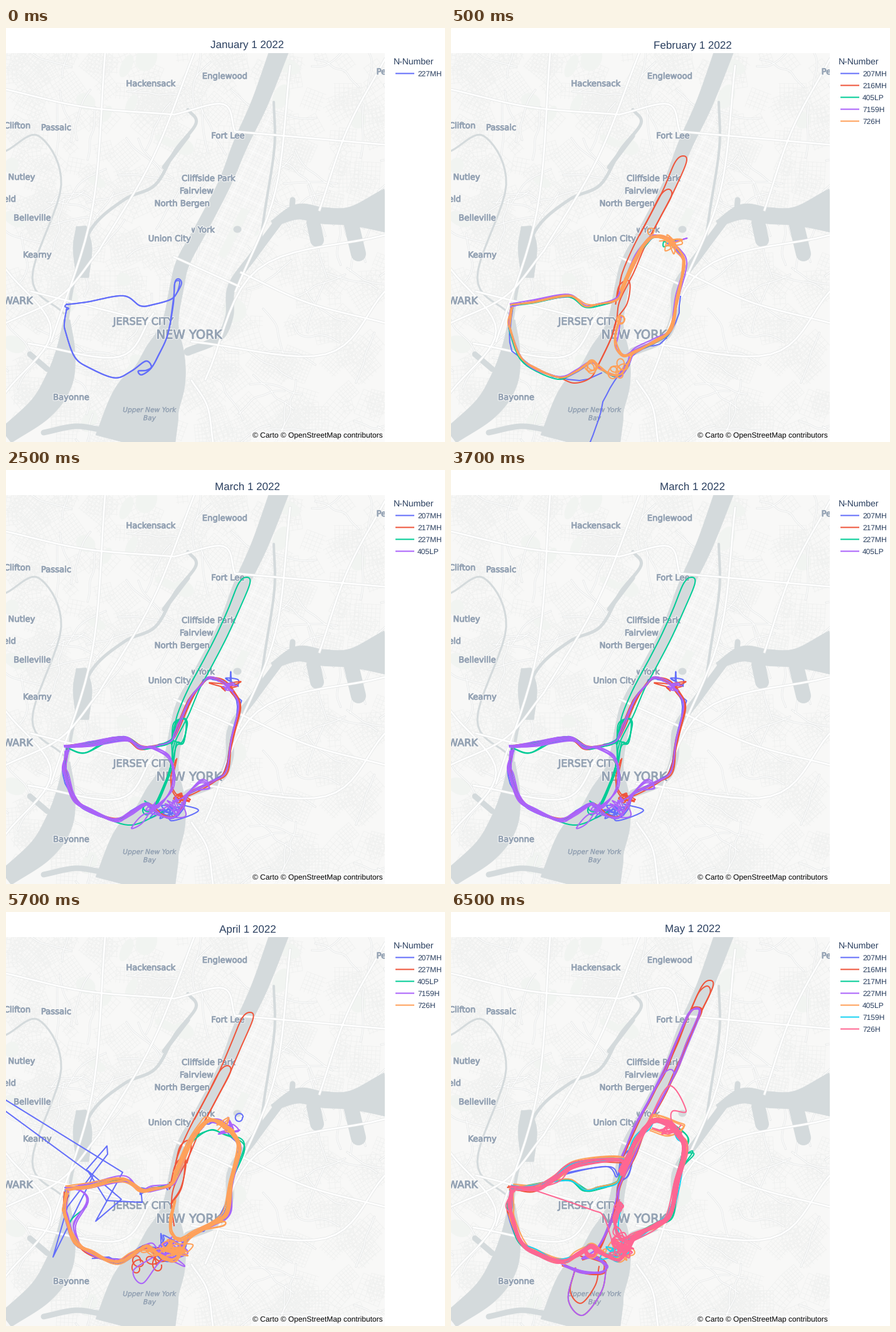
Animation of 700 by 660 pixels, one loop 8 s. Source, as a matplotlib script:

```python
import numpy as np
import matplotlib.pyplot as plt
from matplotlib import patheffects as pe
from matplotlib.animation import FuncAnimation
from matplotlib.collections import LineCollection
from matplotlib.patches import Ellipse, Polygon, Rectangle

plt.rcParams["text.hinting"] = "none"
W, H, PX = 700, 660, 0.72          # stage size, points per pixel
MAP_W, MAP_TOP = 604, 40
LAND, WATER, PARK, CASING = "#f8f8f7", "#d4dadc", "#f1f4f1", "#e5e7e7"
INK, LABEL = "#2a3f5f", "#95a3b4"
BLUE, RED, GREEN, PURPLE, ORANGE, CYAN, PINK = PALETTE = (
    "#636efa", "#ef553b", "#00cc96", "#ab63fa", "#ffa15a", "#19d3f3", "#ff6692")

rng = np.random.default_rng(11)
fig = plt.figure(figsize=(W / 100, H / 100), dpi=100, facecolor="white")
page = fig.add_axes([0, 0, 1, 1], xlim=(0, W), ylim=(H, 0))
city = fig.add_axes([0, 0, MAP_W / W, (H - MAP_TOP) / H], xlim=(0, MAP_W), ylim=(H, MAP_TOP))
for ax in (page, city):
    ax.axis("off")
city.add_patch(Rectangle((0, MAP_TOP), MAP_W, H, color=LAND, zorder=0))


def smooth(points, n=9):
    """Catmull-Rom curve through the points."""
    p = np.array(points, float)
    p = np.vstack([2 * p[0] - p[1], p, 2 * p[-1] - p[-2]])
    a, b, c, d = (p[i:len(p) - 3 + i, None] for i in range(4))
    t = np.linspace(0, 1, n, endpoint=False)[:, None]
    q = 2 * b + (c - a) * t + (2 * a - 5 * b + 4 * c - d) * t**2 + (3 * b - a - 3 * c + d) * t**3
    return np.vstack([(q / 2).reshape(-1, p.shape[1]), p[-2]])


# ---------- base map ----------
def ribbon(rows):
    """Water whose width changes along a centre line of (x, y, width)."""
    x, y, width = smooth(rows).T
    dx, dy = np.gradient(x), np.gradient(y)
    side = np.c_[-dy, dx] * (width / 2 / np.hypot(dx, dy))[:, None]
    mid = np.c_[x, y]
    city.add_patch(Polygon(np.vstack([mid + side, (mid - side)[::-1]]), color=WATER, lw=0.5, zorder=3))


def river(points, width):
    city.plot(*smooth(points).T, color=WATER, lw=width * PX, zorder=3, solid_capstyle="round")


def road(points, width, z):
    line = smooth(points).T
    city.plot(*line, color=CASING, lw=(width + 1.6) * PX, zorder=z)
    city.plot(*line, color="white", lw=width * PX, zorder=z + 0.1)


def highway(x0, y0, x1, y1, bend=0):
    middle = ((x0 + x1) / 2 - bend * np.sign(y1 - y0), (y0 + y1) / 2 + bend * np.sign(x1 - x0))
    road([(x0, y0), middle, (x1, y1)], 2.8, 4)


def street_grid(x, y, angle, size, gap):
    u = np.array([np.cos(angle), np.sin(angle)])
    v = np.array([-u[1], u[0]])
    return [[(x, y) + k * b - size * a, (x, y) + k * b + size * a]
            for a, b in ((u, v), (v, u)) for k in np.arange(-size, size + 1, gap)]


def streets():
    segments = []
    for x, y in rng.uniform((0, 40), (604, 660), (430, 2)):
        segments += street_grid(x, y, rng.uniform(0, 1.6), rng.uniform(9, 24), rng.uniform(5, 9))
    city.add_collection(LineCollection(segments, colors="#f0f1f0", linewidths=0.8 * PX, zorder=1))
    for x, y in rng.uniform((0, 40), (604, 660), (110, 2)):
        heading = rng.uniform(0, 2 * np.pi) + np.cumsum(rng.normal(0, 0.25, 6))
        steps = 17 * np.c_[np.cos(heading), np.sin(heading)]
        road((x, y) + np.cumsum(steps, axis=0), 1.3, 1.5)
    for x, y in rng.uniform((0, 40), (604, 660), (26, 2)):
        city.add_patch(Ellipse((x, y), *rng.uniform(10, 42, 2), angle=25, fc=PARK, zorder=1.2))


def manhattan():
    shape = Polygon([(274, 495), (284, 410), (345, 280), (422, 122), (425, 190), (408, 310),
                     (352, 405), (338, 489), (282, 508)], fc="#f7f7f6", ec="none", zorder=2)
    city.add_patch(shape)
    for gap, color in ((6, "#f0f1f1"), (24, "white")):
        grid = LineCollection(street_grid(350, 320, -1.12, 230, gap),
                              colors=color, linewidths=PX, zorder=2.1)
        city.add_collection(grid)
        grid.set_clip_path(shape)
    city.add_patch(Polygon([(338, 362), (350, 367), (388, 291), (376, 286)], fc=PARK, zorder=2.2))
    city.add_patch(Ellipse((369, 321), 13, 11, fc=WATER, zorder=2.3))


RIVER = [(438, 30, 30), (405, 118, 26), (374, 185, 23), (349, 247, 20), (314, 315, 20), (283, 372, 21),
         (273, 410, 22), (262, 470, 26), (254, 515, 62), (243, 560, 88), (222, 602, 112), (205, 665, 128)]


def waterways():
    ribbon(RIVER)
    ribbon([(97, 465, 10), (95, 515, 30), (84, 563, 44), (56, 606, 40), (0, 650, 28)])
    ribbon([(425, 312, 10), (465, 293, 24), (505, 299, 26), (550, 300, 30), (608, 292, 72)])
    ribbon([(122, 398, 20), (122, 350, 30), (120, 316, 16)])
    river([(38, 520), (66, 544)], 9)
    river([(60, 645), (110, 635), (150, 640)], 9)
    river([(490, 310), (496, 338)], 22)
    river([(550, 310), (562, 360)], 24)
    river([(456, 290), (457, 274)], 9)
    river([(290, 516), (338, 495), (356, 460), (360, 412), (395, 362), (438, 304)], 13)
    river([(404, 350), (413, 290), (428, 190), (427, 118)], 4)
    river([(97, 470), (108, 405), (135, 322), (188, 274), (238, 250), (270, 195), (303, 152), (290, 130)], 5)
    river([(92, 455), (42, 398), (88, 250), (52, 172), (0, 196)], 3)
    river([(252, 222), (290, 172)], 7)


def highways():
    for ends in ((0, 470, 148, 355, 14), (148, 355, 300, 40, 10), (0, 98, 268, 138, 8), (268, 138, 365, 165, -30),
                 (365, 165, 604, 186, 0), (158, 40, 72, 500, -22), (0, 385, 0, 580, -72), (36, 503, 235, 455, 45),
                 (40, 420, 238, 470), (268, 365, 372, 412), (453, 60, 366, 420, -20), (604, 50, 500, 290, 8),
                 (318, 560, 604, 330, -60), (375, 390, 604, 470, 8), (296, 500, 604, 420, 60), (296, 562, 330, 660, -8)):
        highway(*ends)


def place_name(name, x, y, size=13.2, weight=0.7, **style):
    effects = [pe.Stroke(linewidth=2.2, foreground=LAND)] if weight > 0.5 else []
    effects += [pe.Stroke(linewidth=weight, foreground=LABEL), pe.Normal()]
    return city.text(x, y, name, size=size * PX, family="DejaVu Sans", color=LABEL, ha="center",
                     va="center_baseline", clip_on=True, zorder=6, path_effects=effects, **style)


def place_names():
    names = [("Hackensack", 231, 88), ("Englewood", 349, 76), ("Fort Lee", 354, 171), ("Clifton", 18, 155),
             ("Passaic", 80, 158), ("Nutley", 25, 237), ("Bloomfield", -19, 272), ("Belleville", 42, 302),
             ("Kearny", 50, 361), ("Cliffside Park", 323, 239), ("Fairview", 304, 259),
             ("North Bergen", 281, 279), ("Union City", 261, 335), ("Bayonne", 104, 588), ("Pelham", 615, 69)]
    for name, x, y in names:
        place_name(name, x, y)
    place_name("NEWARK", 8, 434, 16)
    place_name("JERSEY CITY", 219, 467, 16)
    place_name("NEW YORK", 292, 488, 19.5)
    place_name("Upper New York", 229, 608, 10.7, 0.2, style="italic")
    place_name("Bay", 229, 621, 10.7, 0.2, style="italic")
    cut = place_name("New York", 303, 321, 13)
    cut.set_clip_path(Rectangle((296, 300), 60, 40, transform=city.transData))


# ---------- flight tracks ----------
groups = []


def month(title, codes):
    text = dict(family="Liberation Sans", color=INK)
    groups.append([page.text(385, 32, title, size=17 * PX, ha="center", **text)])
    for i, (code, color) in enumerate(zip(codes.split(), PALETTE)):
        y = 72.5 + 19 * i
        groups[-1] += page.plot([621, 651], [y, y], color=color, lw=2 * PX, solid_capstyle="butt", snap=False)
        groups[-1].append(page.text(656, y + 4.5, code, size=12 * PX, **text))


def draw(color, line):
    groups[-1] += city.plot(*np.array(line).T, color=color, lw=2 * PX, zorder=8, solid_joinstyle="round")


def track(color, points, copies=1, spread=0.0, rough=0.0):
    """Draw jittered copies of a path; rough adds spikes like a poor signal."""
    for _ in range(copies):
        p = np.array(points, float)
        line = smooth(p + spread * (0.6 * rng.normal(0, 1, 2) + 0.8 * rng.normal(0, 1, p.shape)))
        if rough:
            line = line[::3]
            line = line + (rng.random((len(line), 1)) < 0.25) * rng.normal(0, rough, line.shape)
        draw(color, line)


def tangle(color, center, size, knots):
    """Random wandering loops around a centre."""
    track(color, rng.normal(center, size, (knots, 2)))


def rings(color, center, radius, turns, wobble=1.0):
    t = np.linspace(0, 2 * np.pi * turns, 24 * turns)
    drift = wobble * np.c_[np.sin(0.23 * t), np.cos(0.31 * t)]
    draw(color, center + drift + radius * np.c_[np.cos(t), np.sin(t)])


WEST = [(97, 441), (130, 437), (187, 427), (214, 443), (235, 441), (262, 433)]
WEST_HIGH = [(97, 439), (135, 441), (165, 425), (200, 401), (271, 394)]
HUDSON = [(272, 417), (294, 367), (311, 343)]
TOP = [(324, 332), (345, 337), (362, 355)]
EAST = [(372, 378), (360, 430), (350, 480), (328, 498), (292, 517)]
DOWNTOWN = [(275, 522), (264, 510), (263, 490), (270, 462)]
HARBOR_TURN = [(282, 537), (268, 554), (252, 551), (236, 541)]
PIER = [(269, 435), (264, 465), (255, 495), (235, 537)]
SOUTH = [(223, 532), (200, 547), (174, 558), (135, 543), (110, 525), (95, 485), (93, 470), (97, 446)]
STATUE, HARBOR, MEADOW = (223, 540), (268, 540), (353, 343)


def lap(color, copies=1, spread=1.5, rough=0.0, west=WEST):
    track(color, west + HUDSON + TOP + EAST + HARBOR_TURN + SOUTH, copies, spread, rough)


def east_side(color, copies, spread=2.0):
    track(color, HUDSON + TOP + EAST + DOWNTOWN, copies, spread)


def upriver(color, tip, copies=1, spread=0.0, bottom=390, before=(), after=()):
    """Up one bank, a U-turn at the tip, and down the other bank."""
    river_x, river_y, _ = np.transpose(RIVER)
    ys = np.linspace(bottom, tip + 10, 2 + int((bottom - tip) / 50))
    xs = np.interp(ys, river_y, river_x) + 4
    up, down = np.c_[xs - 9, ys], np.c_[xs + 9, ys][::-1]
    track(color, [*before, *up, (xs[-1] + 4, tip), *down, *after], copies, spread)


def january():
    month("January 1 2022", "227MH")
    statue_loop = [(231, 543), (216, 553), (211, 547), (224, 546), (232, 540), (223, 531)]
    for shift in (0, 3):
        turn = [(272, 423), (280 - shift, 407), (275, 400 + shift), (269, 407), (267, 440 - 3 * shift)]
        track(BLUE, WEST + turn + [(258, 488), (243, 522)] + statue_loop + SOUTH[1:], 1, 0.15)
    track(BLUE, [(97, 440), (94, 444), (100, 447), (96, 450)])


def february():
    month("February 1 2022", "207MH 216MH 405LP 7159H 726H")
    lap(BLUE, 2, 1.2, 0.6)
    track(BLUE, [(222, 660), (235, 625), (248, 585), (268, 552), (300, 510), (333, 504), (358, 470), (366, 428)], 1, 0, 1.8)
    track(BLUE, [(94, 475), (97, 515), (148, 549), (205, 562), (240, 550)], 1, 0, 1)
    upriver(RED, 204, before=WEST, after=PIER + [(222, 558), (197, 566)] + SOUTH[2:])
    upriver(RED, 257, bottom=330)
    upriver(RED, 402, bottom=440, after=PIER[1:])
    lap(GREEN, 2, 1.2)
    tangle(GREEN, MEADOW, (8, 5), 8)
    lap(PURPLE, 2)
    east_side(PURPLE, 2)
    tangle(PURPLE, (356, 338), (6, 4), 6)
    lap(ORANGE, 3, 1.6)
    east_side(ORANGE, 4, 1.8)
    rings(ORANGE, (270, 465), 6, 2)
    rings(ORANGE, STATUE, 8, 3, 3)
    rings(ORANGE, (266, 543), 8, 4, 8)
    rings(ORANGE, (318, 324), 5, 1)
    tangle(ORANGE, MEADOW, (8, 7), 14)


def march():
    month("March 1 2022", "207MH 217MH 227MH 405LP")
    lap(BLUE, 3, 1.5, 1.4)
    track(BLUE, [(135, 435), (165, 428), (198, 430)], 1, 0, 6)
    track(BLUE, [(97, 455), (93, 480), (99, 508)], 1, 0, 4)
    tangle(BLUE, (358, 338), (9, 6), 10)
    tangle(BLUE, (265, 545), (17, 7), 18)
    lap(RED, 2, 1.4)
    east_side(RED, 2, 1.6)
    tangle(RED, MEADOW, (9, 5), 10)
    tangle(RED, (276, 528), (9, 7), 12)
    upriver(GREEN, 171, before=WEST, after=PIER + SOUTH)
    upriver(GREEN, 395, 3, 1.6, 435, WEST, PIER + SOUTH[:1])
    track(GREEN, [(97, 444), (125, 451), (160, 433), (187, 427)], 2, 1)
    track(GREEN, [(250, 545), (200, 566), (150, 552)])
    rings(GREEN, STATUE, 7, 2, 3)
    lap(PURPLE, 2, 1.2)
    track(PURPLE, WEST[:5] + [(262, 460), (265, 505), (240, 537)] + SOUTH, 4, 2.2)
    track(PURPLE, [(238, 530), (218, 562), (200, 571), (222, 548), (255, 553), (286, 552), (280, 530)])
    track(PURPLE, [(285, 522), (312, 497), (322, 505), (302, 510)], 3, 2)
    tangle(PURPLE, MEADOW, (8, 6), 9)
    tangle(PURPLE, (266, 535), (10, 9), 16)
    tangle(PURPLE, (232, 540), (7, 5), 10)


def april():
    month("April 1 2022", "207MH 227MH 405LP 7159H 726H")
    draw(BLUE, [(0, 300), (186, 415), (143, 493), (184, 458), (130, 412), (160, 460), (217, 463), (215, 440)])
    draw(BLUE, [(0, 318), (139, 420), (75, 550), (98, 470), (162, 386), (161, 373), (128, 411)])
    lap(BLUE, 4, 2, 1.6)
    track(BLUE, WEST[3:], 2, 0, 6)
    track(BLUE, SOUTH[1:4], 2, 2, 5)
    rings(BLUE, (371, 327), 6, 1)
    tangle(BLUE, (258, 538), (20, 10), 20)
    upriver(RED, 160, before=WEST, after=PIER[:2] + [(268, 500)])
    upriver(RED, 245, bottom=330)
    upriver(RED, 364, bottom=400)
    upriver(RED, 394, 2, 1.2, 440, WEST[-1:], PIER[1:2])
    track(RED, SOUTH, 4, 2)
    rings(RED, (238, 554), 10, 3, 9)
    rings(RED, (205, 562), 8, 2, 6)
    lap(GREEN, 1, 1.2)
    track(GREEN, HUDSON[:2] + [(322, 347), (345, 353), (380, 372)] + EAST[1:], 2, 2)
    track(GREEN, [(128, 470), (102, 495), (112, 525)])
    lap(PURPLE, 3, 2.6)
    track(PURPLE, [(98, 441), (122, 447), (128, 462), (108, 500), (116, 530)], 3, 1.8)
    track(PURPLE, [(235, 550), (203, 572), (218, 592), (250, 555), (285, 565), (262, 545)])
    tangle(PURPLE, MEADOW, (10, 7), 20)
    tangle(PURPLE, HARBOR, (14, 10), 18)
    lap(ORANGE, 6, 1.9)
    east_side(ORANGE, 6, 2.2)
    track(ORANGE, [(310, 505), (345, 493), (346, 500), (310, 508)], 2, 1)
    tangle(ORANGE, (356, 342), (9, 6), 16)
    tangle(ORANGE, (268, 537), (14, 9), 44)
    tangle(ORANGE, (228, 541), (9, 7), 16)


def may():
    month("May 1 2022", "207MH 216MH 217MH 227MH 405LP 7159H 726H")
    upriver(BLUE, 380, 2, 1.3, 420, [(135, 440), (175, 419), (250, 406)], PIER + SOUTH)
    upriver(RED, 109)
    upriver(RED, 118, bottom=180)
    upriver(RED, 151, 4, 1.4, 390, WEST_HIGH, PIER + SOUTH)
    track(RED, WEST_HIGH, 4, 2.5)
    bay_loop = np.array([(248, 565), (240, 605), (210, 643), (187, 618), (198, 568)])
    for scale in (1, 0.75):
        track(RED, (200, 566) + scale * (bay_loop - (200, 566)))
    bay_turn = [(180, 564), (212, 574), (240, 576), (246, 564), (228, 551), (210, 553)]
    track(RED, bay_turn, 3, 2)
    lap(GREEN, 3, 2.2)
    track(GREEN, [(347, 333), (378, 360), (374, 385), (386, 384), (366, 418), (354, 482), (338, 498)], 2, 1.5)
    upriver(PURPLE, 155, 2, 1.2, 390, WEST_HIGH, PIER + bay_turn[::-1])
    upriver(PURPLE, 251, bottom=330)
    track(PURPLE, bay_loop)
    track(PURPLE, bay_turn, 4, 2)
    lap(ORANGE, 4, 2.6, west=WEST_HIGH)
    lap(ORANGE, 1, 1.5)
    track(ORANGE, [(312, 340), (325, 323), (360, 338), (372, 344), (350, 358), (318, 349)], 2, 2)
    tangle(ORANGE, HARBOR, (13, 9), 20)
    rings(ORANGE, STATUE, 10, 2, 2)
    lap(CYAN, 3, 2.4, west=WEST_HIGH)
    lap(CYAN, 1, 1)
    east_side(CYAN, 4, 2.6)
    tangle(CYAN, (260, 540), (12, 7), 14)
    lap(PINK, 8, 2.1, west=WEST_HIGH)
    east_side(PINK, 7, 2.6)
    track(PINK, [(135, 444), (222, 474), (243, 485), (257, 525)])
    track(PINK, [(314, 335), (348, 277), (375, 317), (354, 317), (351, 330), (360, 348)])
    tangle(PINK, (347, 347), (12, 6), 24)
    tangle(PINK, (272, 534), (11, 10), 34)
    rings(PINK, STATUE, 8, 5, 2)
    rings(PINK, (267, 470), 5, 3, 3)
    rings(PINK, (98, 442), 4, 2)


for build in (streets, manhattan, waterways, highways, place_names,
              january, february, march, april, may):
    build()
city.add_patch(Rectangle((391, 643), 213, 17, color="white", alpha=0.5, lw=0, zorder=9))
city.text(601, 654, "© Carto © OpenStreetMap contributors", size=12 * PX,
          family="Liberation Sans", color="black", ha="right", zorder=10)
page.text(618, 58, "N-Number", size=14 * PX, family="Liberation Sans", color=INK)

STEP = 500
STARTS = [0, 500, 2500, 4500, 6500]


def update(i):
    current = sum(i * STEP >= start for start in STARTS) - 1
    for k, group in enumerate(groups):
        for artist in group:
            artist.set_visible(k == current)
    return []


animation = FuncAnimation(fig, update, frames=16, init_func=lambda: update(0),
                          interval=STEP, repeat=True, repeat_delay=0)
plt.show()
```
